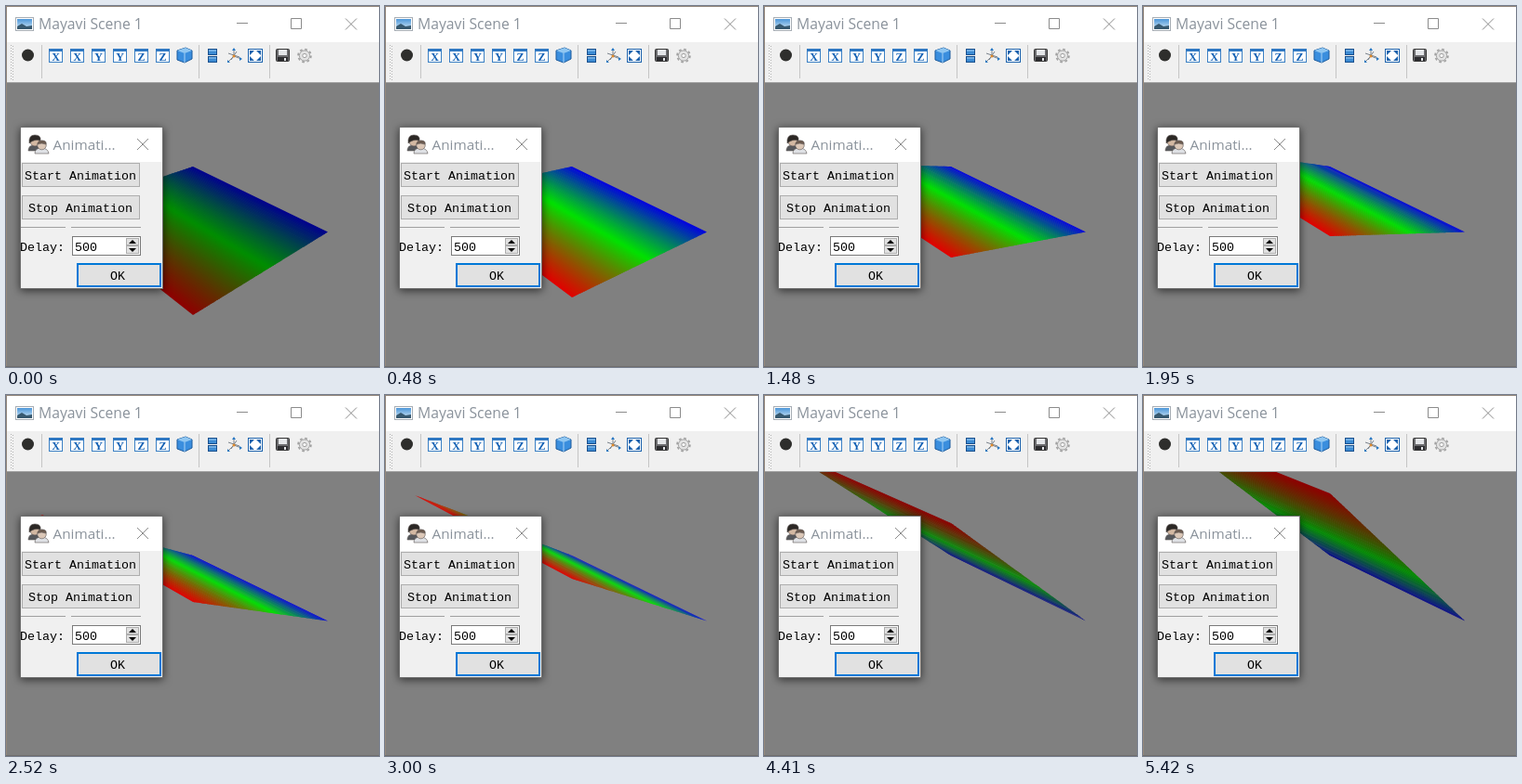
An HTML page for the animation above (5510 ms loop, 401 by 389 pixels).

```html
<!DOCTYPE html>
<html lang="en">
<head>
<meta charset="utf-8">
<title>Mayavi Scene 1</title>
<style>
  html, body { margin: 0; width: 100%; height: 100%; overflow: hidden; background: #808080; }
  svg { display: block; }
  .title { font: 15.7px "Open Sans", "Noto Sans", sans-serif; fill: #8a929b; }
  .mono { font: 13.33px "Liberation Mono", monospace; fill: #000; }
  .axis { font: bold 12px "Liberation Serif", serif; fill: #1260b4; text-anchor: middle; }
  .thin { fill: none; stroke: #8b8b8b; }
  .button { fill: #e1e1e1; stroke: #adadad; }
  #dialog { filter: drop-shadow(0 2px 5px rgba(0, 0, 0, .6)); }
</style>
</head>
<body>
<svg width="401" height="389" viewBox="0 0 401 389">
  <defs>
    <clipPath id="viewport"><rect x="1" y="83" width="400" height="305"/></clipPath>
    <linearGradient id="sky" x2="0" y2="1">
      <stop stop-color="#4b96d8"/><stop offset="1" stop-color="#d3e8f6"/>
    </linearGradient>
  </defs>

  <rect width="401" height="389" fill="#808080"/>
  <g id="surface" clip-path="url(#viewport)"></g>

  <!-- Window frame, title bar and toolbar -->
  <rect width="401" height="39" fill="#fff"/>
  <rect y="39" width="401" height="43" fill="#f0f0f0"/>
  <path d="M1 82.5H401" stroke="#a0a0a0"/>
  <path d="M0 .5H401M.5 0V389" stroke="#94877b"/>
  <path d="M0 388.5H401" stroke="#706e6d"/>
  <rect x="10.5" y="12.5" width="19" height="14" fill="#fff" stroke="#a6adb4"/>
  <rect x="12" y="14" width="16" height="11" fill="url(#sky)"/>
  <path d="M12 25V22L17 19 22 22 28 21V25Z" fill="#37596f"/>
  <text class="title" x="35" y="25">Mayavi Scene 1</text>
  <path class="thin" d="M248 18.5H260M306.5 13.5H317.5V24.5H306.5ZM365 13.5L377 25.5M377 13.5L365 25.5"/>

  <path d="M5.5 42V81M7.5 43V81" stroke="#b4b4b4" stroke-dasharray="1 2"/>
  <path d="M38.5 42V78M207.5 42V78M283.5 42V78" stroke="#c5c5c5"/>
  <circle cx="23.5" cy="53" r="6.5" fill="#2e2e2c"/>
  <g id="axes"></g>

  <path d="M184 48L193 45 200 48V57L192 61 184 58Z" fill="#3a8ede" stroke="#1c5a9c"/>
  <path d="M184 48L192 51 200 48 193 45Z" fill="#8fc6f1"/>
  <path d="M192 51V61" stroke="#a9d3f5"/>
  <g fill="#3d8bd3" stroke="#174f8d">
    <rect x="217.5" y="46.5" width="9" height="6"/>
    <rect x="217.5" y="54.5" width="9" height="6"/>
  </g>
  <path d="M218 48H226M218 56H226" stroke="#9fcdf3"/>
  <path d="M245 46V54L239 60M245 54L253 57M239 51L251 55M248 49L242 58" fill="none" stroke="#7a828b"/>
  <path d="M243 48L245 45 247 48ZM238 58V61H241ZM251 55L254 57 251 59Z" fill="#2878c4"/>
  <circle cx="245" cy="54" r="1.5" fill="#e08a2c"/>
  <rect x="260.5" y="46.5" width="15" height="14" fill="#fff" stroke="#1c62ad"/>
  <path d="M262 48H267L262 53ZM274 48V53L269 48ZM262 59V54L267 59ZM274 59H269L274 54Z" fill="#1b62ad"/>
  <rect x="290.5" y="46.5" width="14" height="13" rx="1" fill="#6b6b6e" stroke="#333"/>
  <rect x="293" y="47" width="9" height="6" fill="#e3e5e8"/>
  <rect x="292" y="55" width="11" height="4" fill="#2c2c2f"/>
  <rect x="299" y="56" width="2" height="3" fill="#e3e5e8"/>
  <circle cx="321" cy="53.5" r="6.9" fill="none" stroke="#a2a2a2" stroke-width="1.8" stroke-dasharray="2.7 2.72"/>
  <circle cx="321" cy="53.5" r="5.6" fill="#e4e4e4" stroke="#a2a2a2"/>
  <circle cx="321" cy="53.5" r="2.2" fill="#f6f6f6" stroke="#a2a2a2"/>

  <!-- Animation dialog -->
  <g id="dialog">
    <rect x="15" y="130" width="154" height="175" fill="#6f6f6f"/>
    <rect x="16" y="131" width="152" height="37" fill="#fff"/>
    <rect x="16" y="168" width="152" height="136" fill="#f0f0f0"/>
  </g>
  <g stroke="#5b5552" stroke-width=".6">
    <path d="M24 156Q24 150 30 150T37 156Z" fill="#56585c"/>
    <circle cx="31" cy="146" r="5" fill="#d3b8a2"/>
    <path d="M25 148Q24 139 31 139T37 145Q30 143 25 148Z" fill="#2c2825"/>
    <path d="M31 159Q31 153 38 153T46 159Z" fill="#dfe1e5"/>
    <circle cx="38.5" cy="150" r="4.8" fill="#dcc8b8"/>
    <path d="M34 149Q34 145 39 145T43 149Q38 147 34 149Z" fill="#6d5c50"/>
  </g>
  <text class="title" x="50.5" y="155" style="font-size:15.3px">Animati...</text>
  <path class="thin" d="M141 143L153 155M153 143L141 155"/>

  <rect class="button" x="17.5" y="169.5" width="126" height="25"/>
  <rect class="button" x="17.5" y="204.5" width="126" height="25"/>
  <text class="mono" x="20" y="187">Start Animation</text>
  <text class="mono" x="24" y="222">Stop Animation</text>
  <path d="M16 238.5H64M70 238.5H145" stroke="#a0a0a0"/>
  <text class="mono" x="15" y="264">Delay:</text>
  <rect x="71.5" y="248.5" width="73" height="20" fill="#fff" stroke="#7a7a7a"/>
  <text class="mono" x="74" y="264">500</text>
  <rect class="button" x="129.5" y="250.5" width="13" height="7"/>
  <rect class="button" x="129.5" y="258.5" width="13" height="8"/>
  <path d="M132 256L136 252 140 256ZM132 261H140L136 265Z"/>
  <rect x="77" y="278" width="89" height="24" fill="#e1e1e1" stroke="#0078d7" stroke-width="2"/>
  <text class="mono" x="112" y="295">OK</text>
</svg>

<script>
const LOOP = 5510, FIRST_STEP = 465, STEP = 493, STRIPS = 80;
const BACK = [201, 173], RIGHT = [346, 243.5];
// Height of the front corner after each animation step.
const FRONT_Y = [333, 314, 293, 271, 248, 223, 198, 173, 155, 138, 122, 106];

const make = (tag, attributes, parent) => {
  const node = document.createElementNS("http://www.w3.org/2000/svg", tag);
  for (const name in attributes) node.setAttribute(name, attributes[name]);
  return parent.appendChild(node);
};

const axes = document.getElementById("axes");
[..."XXYYZZ"].forEach((letter, i) => {
  const x = 54 + 23 * i;
  make("rect", { x: x - 7.5, y: 46.5, width: 14, height: 14, fill: "#fff", stroke: "#3a7fc4" }, axes);
  make("rect", { x: x - 8, y: 46, width: 15, height: 3, fill: "#2f78c2" }, axes);
  make("text", { x: x - 0.5, y: 59, class: "axis" }, axes).textContent = letter;
});

const surface = document.getElementById("surface");
const strips = Array.from({ length: STRIPS }, () => make("polygon", {}, surface));

// Perspective-correct point between two projected corners with weights wa and wb.
const between = (a, wa, b, wb, v) => {
  const p = wa * (1 - v), q = wb * v;
  return a.map((n, i) => (p * n + q * b[i]) / (p + q));
};

// Blue at the fixed edge, green halfway, red at the moving edge.
const stripColor = (v, light) => {
  const channels = [2 * v - 1, 1 - Math.abs(2 * v - 1), 1 - 2 * v];
  return `rgb(${channels.map(c => Math.round(light * Math.max(0, c))).join()})`;
};

// The side facing away from the light is dark.
const brightness = step => step === 0 || step > 7 ? 142 : 226;

let shown = -1;
function draw(step) {
  const frontY = FRONT_Y[step], rise = frontY - 198;
  const front = [201, frontY], left = [32 + 0.2 * rise, 108 + 0.835 * rise];
  // Corner weights follow from the sheet being a parallelogram in space.
  const backW = 1.25, rightW = 1;
  const leftW = (RIGHT[0] - BACK[0]) / (BACK[0] - left[0]);
  const frontW = rightW + leftW - backW;
  const light = brightness(step);
  strips.forEach((strip, i) => {
    const from = i / STRIPS, to = Math.min(1, (i + 1.5) / STRIPS);
    const leftEdge = v => between(BACK, backW, left, leftW, v);
    const rightEdge = v => between(RIGHT, rightW, front, frontW, v);
    strip.setAttribute("points", [leftEdge(from), rightEdge(from), rightEdge(to), leftEdge(to)].join(" "));
    strip.setAttribute("fill", stripColor((i + 0.5) / STRIPS, light));
  });
}

function tick() {
  const time = performance.now() % LOOP;
  const step = Math.min(FRONT_Y.length - 1, Math.max(0, Math.floor((time - FIRST_STEP) / STEP) + 1));
  if (step !== shown) draw(shown = step);
  requestAnimationFrame(tick);
}
tick();
</script>
</body>
</html>
```
